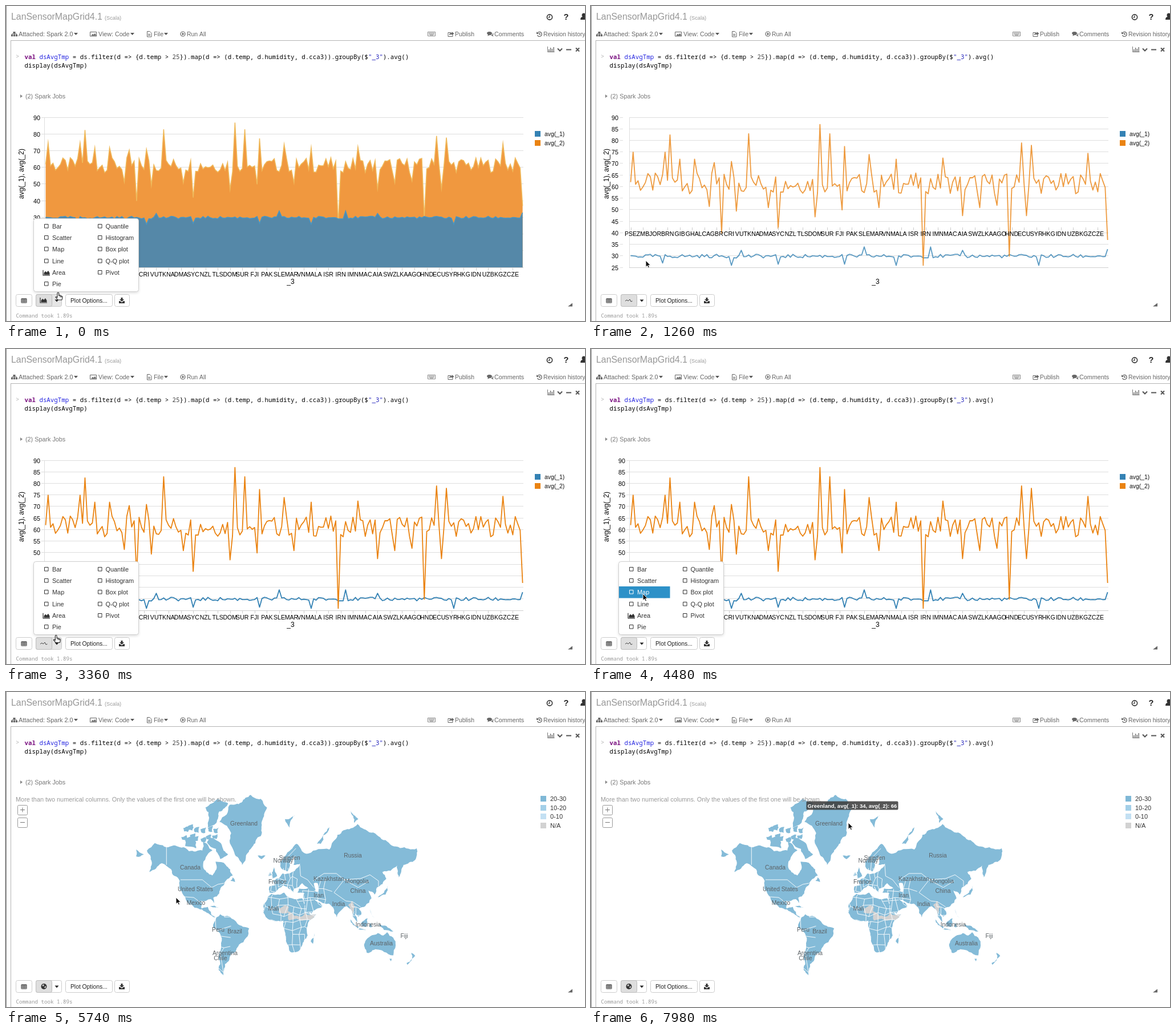
An HTML page with a canvas that plays this animation: 1015x552 px, repeating every 8000 ms.

```html
<!DOCTYPE html>
<html lang="en">
<head>
<meta charset="utf-8">
<title>Notebook plots</title>
<style>
html, body { margin: 0; width: 100%; height: 100%; overflow: hidden; background: #fff; }
canvas { display: block; }
</style>
</head>
<body>
<canvas id="stage" width="1015" height="552"></canvas>
<script>
const ctx = document.getElementById('stage').getContext('2d');
const LOOP = 8000, STEP = 140;
const SANS = '"Liberation Sans", Arial, sans-serif';
const MONO = '"Noto Sans Mono", "DejaVu Sans Mono", monospace';
const BLUE = '#3482b4', ORANGE = '#ea8311', LAND = '#84bbd8', NA = '#d2d2d2';

// ---------- helpers ----------
function text(str, x, y, size = 11, color = '#666', align = 'left', weight = '', family = SANS) {
  ctx.font = `${weight} ${size}px ${family}`;
  ctx.fillStyle = color;
  ctx.textAlign = align;
  ctx.fillText(str, x, y);
  return ctx.measureText(str).width;
}
function rect(x, y, w, h, color) {
  ctx.fillStyle = color;
  ctx.fillRect(x, y, w, h);
}
function box(x, y, w, h, r, fill, stroke) {
  ctx.beginPath();
  ctx.roundRect(x + .5, y + .5, w, h, r);
  if (fill) { ctx.fillStyle = fill; ctx.fill(); }
  if (stroke) { ctx.strokeStyle = stroke; ctx.lineWidth = 1; ctx.stroke(); }
}
function path(d, fill, stroke, width = 1, x = 0, y = 0) {
  const p = new Path2D(d);
  ctx.save();
  ctx.translate(x, y);
  if (fill) { ctx.fillStyle = fill; ctx.fill(p); }
  if (stroke) { ctx.strokeStyle = stroke; ctx.lineWidth = width; ctx.stroke(p); }
  ctx.restore();
}
function circle(x, y, r, fill, stroke, width) {
  ctx.beginPath();
  ctx.arc(x, y, r, 0, 7);
  if (fill) { ctx.fillStyle = fill; ctx.fill(); }
  if (stroke) { ctx.strokeStyle = stroke; ctx.lineWidth = width; ctx.stroke(); }
}
const caret = (x, y, color = '#555') => path('M0 0h7l-3.5 4z', color, null, 1, x, y);
const hash = n => { const s = Math.sin(n * 12.9898) * 43758.5453; return s - Math.floor(s); };

// ---------- chart: seeded noise with a few named extremes ----------
const COUNT = 195, X0 = 69.5, DX = 4.31;
const CODES = ('PSE ZMB JOR BRN GIB GHA LCA GBR CRI VUT KNA DMA SYC NZL TLS DOM SUR FJI PAK SLE ' +
  'MAR VNM ALA ISR IRN IMN MAC AIA SWZ LKA AGO HND ECU SYR HKG IDN UZB KGZ CZE').split(' ');
const humidPeaks = {
  1: 75, 14: 75, 16: 82.5, 20: 72, 26: 72, 32: 51.5, 34: 70.5, 37: 40, 41: 71, 43: 49.5, 48: 83, 56: 51,
  60: 42, 75: 47, 77: 87, 81: 83, 86: 50, 87: 77.5, 97: 74, 101: 51, 108: 72, 119: 26, 127: 72.5,
  135: 47.5, 142: 51, 149: 52, 154: 30, 159: 79, 161: 47.5, 163: 78, 186: 74.5, 194: 37
};
const tempPeaks = { 13: 27, 41: 26, 45: 32.5, 60: 26.5, 87: 26.5, 95: 34, 108: 26, 122: 34, 135: 32.5, 166: 26, 194: 33 };
const series = (peaks, mid, spread, seed) =>
  Array.from({ length: COUNT }, (_, i) => peaks[i] ?? mid + (hash(i + seed) - .5) * spread);
const humid = series(humidPeaks, 61.5, 9, 3);
const temp = series(tempPeaks, 30, 1.6, 500);

function trace(values, yOf) {
  ctx.beginPath();
  values.forEach((v, i) => ctx.lineTo(X0 + i * DX, yOf(v)));
}

function axes(min, step, shifted) {
  const yOf = v => 195.5 + (90 - v) * 263 / (90 - min);
  for (let v = min; v <= 90; v += step) {
    const y = Math.round(yOf(v)) - 1;
    rect(67, y, 840, 1, v === min ? '#cfcfcf' : '#dedede');
    rect(shifted ? 51 : 62, y, 5, 1, '#dedede');
    text(v, shifted ? 48 : 60, y + 4.5, 10.8, '#000', 'right');
  }
  rect(67, 195, 1, 263, '#dedede');
  return yOf;
}

function chartLabels(y) {
  CODES.forEach((code, i) => {
    const x = X0 + i * 5 * DX;
    rect(Math.round(x), y - 15, 1, 5, '#ccc');
    text(code, x, y, 10.6, '#000', 'center');
  });
  text('_3', 499, 487, 12, '#000', 'center');
  ctx.save();
  ctx.translate(31, 294);
  ctx.rotate(-Math.PI / 2);
  text('avg(_1), avg(_2)', 0, 0, 12, '#000', 'center');
  ctx.restore();
  [BLUE, ORANGE].forEach((color, i) => {
    rect(927, 219 + i * 16, 10, 10, color);
    text(`avg(_${i + 1})`, 944, 228 + i * 15.7, 10.4, '#111');
  });
}

function areaChart() {
  const yOf = axes(0, 10);
  const layers = [[humid, '#f0983f', '#efba5c'], [temp, '#5588a8', '#4796c4']];
  layers.forEach(([values, fill, edge]) => {
    trace(values, yOf);
    ctx.lineTo(X0 + (COUNT - 1) * DX, 458);
    ctx.lineTo(X0, 458);
    ctx.fillStyle = fill;
    ctx.fill();
    trace(values, yOf);
    ctx.strokeStyle = edge;
    ctx.lineWidth = 1.5;
    ctx.stroke();
  });
  chartLabels(473.5);
}

function lineChart(settling) {
  const yOf = axes(25, 5, settling);
  ctx.globalAlpha = settling ? .8 : 1;
  ctx.lineWidth = 1.8;
  ctx.lineJoin = 'round';
  [[temp, BLUE], [humid, ORANGE]].forEach(([values, color]) => {
    trace(values, yOf);
    ctx.strokeStyle = color;
    ctx.stroke();
  });
  ctx.globalAlpha = 1;
  chartLabels(settling ? 403 : 473.5);
}

// ---------- world map: a few lon,lat corners, Mercator view, fractal coasts ----------
const project = (lon, lat) =>
  [474 + lon * 1.3667, 406 - 78.3 * Math.log(Math.tan(Math.PI / 4 + lat * Math.PI / 360))];
const points = str => str.split(' ').map(p => project(...p.split(',').map(Number)));

function roughen(a, b, out) {
  const dx = b[0] - a[0], dy = b[1] - a[1];
  if (Math.hypot(dx, dy) < 5) return out.push(b);
  const k = (hash(a[0] + b[1]) - .5) * .3;
  const mid = [(a[0] + b[0]) / 2 - dy * k, (a[1] + b[1]) / 2 + dx * k];
  roughen(a, mid, out);
  roughen(mid, b, out);
}
const toPath = pts => 'M' + pts.map(p => p.map(n => n.toFixed(1))).join('L');
function coast(str) {
  const pts = points(str), out = [];
  pts.forEach((p, i) => roughen(p, pts[(i + 1) % pts.length], out));
  return new Path2D(toPath(out) + 'Z');
}

const americas = [
  '-166,68 -156,71.3 -128,70 -95,68 -94,72 -82,68 -94,59 -82,52.5 -77,57 -78,62 -65,60 -56,52.5 -65,48 -70,43 -81,31.5 -80,25.5 -84,30 -97,28 -96,19 -88,21 -84,15 -83,11 -78,8 -87,13 -105,20 -113,30 -110,23 -117,32.5 -124,40 -124,48 -135,57 -147,61 -163,55 -160,60',
  '-73,78.3 -60,82 -33,83.6 -12,81.5 -20,74 -39,65.5 -44,60 -54,67 -58,75',
  '-62,66 -72,63.5 -89,71.5 -86,73.5 -70,70.5', '-62,82.3 -75,83 -91,81.5 -88,76.5 -77,78',
  '-117,73 -105,73.5 -103,69 -117,70', '-59,48 -56,51 -53,47', '-85,22 -74,20 -78,20.5',
  '-77,8 -72,12 -60,9 -50,0 -35,-6 -39,-18 -48,-26 -58,-36 -66,-46 -68,-55 -74,-51 -71,-30 -70,-18 -81,-5'
];
const africa = [
  '-6,35.8 10,37 20,31 33,31 43,11.5 51,12 40,-3 40,-15 33,-27 26,-34 18,-34 12,-17 9,4 -8,4.5 -17,14.5 -13,27.5',
  '49,-12 47,-25 44,-22'
];
const eurasia = [
  '28,70 41,66.5 68,68.5 73,72 104,77.7 140,72.5 180,69 178,63 163,60 157,51 155,59.5 136,55 141,50 129,42 126,35 118,39 122,31 114,22 106,19 109,12 105,9 100,13 104,2 98,9 97,16 90,22 80,14 77.5,8 73,20 67,25 57,27 48,30 56,26 59,22 45,13 35,28 36,36.5 27,37 29,41 41,41.5 33,46 23,41 22,37 12,45 18,40 9,44 -2,37 -9,37 -9,43 -2,44 -4,48 8,54 20,55 30,60',
  '5,59 5,62 14,67 26,71 31,69 31,61 22,60 25,65.5 17,61 14,55.5',
  '-5,50 1,52 -3,58.5', '-10,52 -6,53 -8,55', '-24,65.5 -14,65.5 -19,63.4', '11,79 25,80.2 17,76.7',
  '52,71 68,76.8 57,71', '95,81 105,79 100,78', '130,32 138,37 143,44 140,35', '-180,68.5 -170,66 -180,65'
];
const oceania = [
  '95,5.5 106,-4 104,-6', '105,-6.5 114,-7.5 114,-8.6', '109,1.5 117,7 116,-4 110,-3', '119,-4 121,1 122,-5',
  '131,-1 141,-3 150,-10 138,-8', '120,18.5 126,7 122,12',
  '114,-22 130,-12 137,-15 142,-11 153,-27 150,-37.5 138,-34 131,-31.5 116,-35',
  '145,-41 148,-41 147,-43.5', '173,-35 178,-38 174,-41', '174,-41 168,-46.5 167,-45'
];
// Loose islands of the Canadian north
const isles = Array.from({ length: 12 }, (_, i) => {
  const lon = -122 + (i % 6) * 7.5 + hash(i) * 4, lat = (i < 6 ? 72.5 : 76) + hash(i + 40) * 2;
  return `${lon},${lat} ${lon + 7},${lat + .6} ${lon + 6},${lat - 1.2} ${lon + 1},${lat - 1}`;
});
const land = new Path2D();
[...americas, ...isles, ...africa, ...eurasia, ...oceania].forEach(s => land.addPath(coast(s)));
const caspian = coast('48,46 53,46 53,37.5 50,38');
const noData = [
  '3,14 4,19 12,23 16,21 14,13', '14,16 19,14 23,10 34,10 36,14 43,11 51,12 46,3 36,4.5 16,4',
  '92,23 97,28 101,21 98,12 95,16'
].map(coast);

const borders = new Path2D([
  '-141,60 -141,70', '-123,49 -95,49 -83,42 -75,45 -67,46', '-117,32.5 -106,31.8 -97,26',
  '30,60 31,52 40,49 48,42', '47,48 61,54 77,54 87,49 108,50 120,53 131,48 131,43',
  '87,49 105,42 119,48', '87,49 74,37 89,28 98,27 108,21', '12,56 13,64 25,69'
].map(s => toPath(points(s))).join(''));

// Small countries: a jittered mesh with some edges left out
function mesh(west, south, east, north, cell) {
  const node = (i, j) => project(
    west + (i + (hash(i * 7 + j * 31 + cell) - .5) * .7) * cell,
    south + (j + (hash(i * 13 + j * 17 + cell) - .5) * .7) * cell);
  for (let i = 0; i * cell < east - west; i++) {
    for (let j = 0; j * cell < north - south; j++) {
      [[i + 1, j], [i, j + 1]].forEach(([u, v], side) => {
        if (hash(i * 5 + j * 11 + side * 3) < .8) borders.addPath(new Path2D(toPath([node(i, j), node(u, v)])));
      });
    }
  }
}
mesh(-15, -33, 45, 32, 9);
mesh(-8, 38, 30, 55, 6);
mesh(-80, -50, -60, 10, 11);
mesh(36, 14, 72, 46, 9);
mesh(98, 10, 108, 22, 5);

const places = [
  ['Greenland', 417, 234], ['Canada', 323, 310.5], ['United States', 332, 348.5], ['Mexico', 333, 373], ['Peru', 372, 419.5],
  ['Brazil', 401, 422.5], ['Argentina', 384, 461], ['Chile', 376, 470], ['Sweden', 497, 294], ['Norway', 486, 298.5],
  ['France', 476, 335.5], ['Mali', 469, 383], ['Russia', 608, 290], ['Kazakhstan', 566, 331], ['Mongolia', 615, 334.5],
  ['China', 617, 351.5], ['Iran', 548, 359.5], ['India', 583, 374.5], ['Indonesia', 635, 410.5], ['Fiji', 698, 431], ['Australia', 658, 444]
];
const bands = [['20-30', '#7fb8d6'], ['10-20', '#a3cfe8'], ['0-10', '#c3e0f3'], ['N/A', NA]];

function worldMap() {
  ctx.save();
  ctx.fillStyle = LAND;
  ctx.fill(land);
  ctx.clip(land);
  ctx.fillStyle = NA;
  noData.forEach(p => ctx.fill(p));
  ctx.strokeStyle = '#fff';
  ctx.lineWidth = .9;
  ctx.stroke(borders);
  ctx.fillStyle = '#fff';
  ctx.fill(caspian);
  ctx.restore();
  places.forEach(([name, x, y]) => text(name, x, y, 10.3, '#5c6266', 'center'));
  text('More than two numerical columns. Only the values of the first one will be shown.', 17, 191.5, 10.9, '#999');
  [198, 220].forEach((y, i) => {
    box(20, y, 17, 17, 2, '#fff', '#999');
    rect(25, y + 8, 8, 1, '#777');
    if (!i) rect(28.5, y + 4.5, 1, 8, '#777');
  });
  bands.forEach(([label, color], i) => {
    rect(937, 182 + Math.round(i * 15.7), 10, 10, color);
    text(label, 954, 191 + i * 15.7, 11, '#333');
  });
}

function tooltip(str, x, y, w) {
  box(x, y, w, 15, 2, 'rgba(62,62,62,.88)');
  text(str, x + w / 2 + .5, y + 11.5, 9.5, '#fff', 'center', 'bold');
}

// ---------- notebook frame ----------
function header() {
  const g = '#666';
  rect(0, 0, 1, 552, '#8a8a8a');
  text('LanSensorMapGrid4.1', 9, 24, 15.9, '#979797');
  text('(Scala)', 173, 24, 9.2, '#999');
  circle(953, 19.5, 4.6, null, '#333', 1.6);
  path('M953 16.5v3.3h-2.5', null, '#333', 1.2);
  text('?', 982, 24, 14.5, '#222', 'center', 'bold');
  path('M1007 24q0-5 4-5h5v5z', '#333');
  circle(1013, 16, 3.5, '#333');

  path('M12.5 45h4v3h-4zM9 50h3.2v3.2H9zM13 50h3.2v3.2H13zM17 50h3.2v3.2H17z', g);
  path('M10.5 50v-1.2h8V50M14.5 48v2', null, g);
  text('Attached: Spark 2.0', 22, 52.5, 10.9);
  path('M147.5 45.5h11v7.5h-11z', null, g);
  path('M149 52l3-3 2 1.5 2-3 2 4.5z', g);
  text('View: Code', 162, 52.5, 10.7);
  path('M247.5 44.5h4.5l3 3v6.5h-7.5zM249 49.5h4M249 51.5h4', null, g);
  text('File', 259, 52.5, 10.6);
  [119, 218, 277].forEach(x => caret(x, 47));
  circle(310, 49, 4, null, g, 1.2);
  path('M308.7 46.5l4 2.5-4 2.5z', g);
  text('Run All', 317, 52.5, 10.4);

  path('M739.5 45.5h13v7h-13zM741 47.5h10M741 49.5h10M743 51h6', null, '#888');
  path('M780 46.5h-5v7h8v-3', null, g);
  path('M777 51q0-4 4.5-4v-2l4 3.2-4 3.2v-2q-3 0-4.5 1.6z', g);
  text('Publish', 787, 53, 10.4);
  path('M843 48a4.5 3 0 1 1 5 3l-4 1.5 1-2zM850 51q4 0 3.5-4 2 2 0 4l1 2.5-3-1.5z', g);
  text('Comments', 856, 53, 10.8);
  path('M932 47a4 4 0 1 1-.5 4M935 47v2.5h2', null, g, 1.3);
  path('M930 45v4h4z', g);
  text('Revision history', 942, 53, 10.4);

  rect(8, 60, 1007, 1, '#b4b4b4');
  rect(8, 60, 1, 492, '#b4b4b4');
  path('M949.5 71v9.5h12', null, '#777');
  [4, 7, 5, 8].forEach((h, i) => rect(951 + i * 2.8, 80 - h, 1.5, h, '#777'));
  path('M967 74.5l4 4 4-4M999 73.5l6 6M1005 73.5l-6 6M982 76.5h9', null, '#555', 2);
}

const code = [['val', '#7a1080', 'bold'], [' '], ['dsAvgTmp', '#2424e0'],
  [' = ds.filter(d => {d.temp > '], ['25', '#444'], ['}).map(d => (d.temp, d.humidity, d.cca3)).groupBy($'],
  ['"_3"', '#2222bb'], [').avg()']];

function cell() {
  text('>', 17, 92, 10.8, '#b5b5b5', 'left', '', MONO);
  let x = 32.5;
  code.forEach(([str, color = '#000', weight]) => x += text(str, x, 92.5, 10.8, color, 'left', weight, MONO));
  text('display(dsAvgTmp)', 32.5, 107.5, 10.8, '#000', 'left', '', MONO);
  path('M25 155l4 3-4 3z', '#888');
  text('(2) Spark Jobs', 34, 162, 10.8, '#777');
  text('Command took 1.89s', 17.5, 546, 9.17, '#999', 'left', '', MONO);
  path('M985 526.5l8-6v6z', '#666');
}

function areaIcon(x, y) {
  path('M0 0v9h12', null, '#333', 1.2, x, y);
  path('M1.5 8v-3l2.5-3 2.5 2 2.5-3 2.5 4v3z', '#333', null, 1, x, y);
}

function toolbar(view, overCaret) {
  box(17, 505, 28, 21, 3, '#fff', '#ccc');
  box(52, 505, 45, 21, 3, overCaret ? '#e6e6e6' : '#fff', '#ccc');
  box(52, 505, 28, 21, 3, '#dedede', '#bbb');
  box(104, 505, 82, 21, 3, '#fff', '#ccc');
  box(190, 505, 26, 21, 3, '#fff', '#ccc');
  box(26, 512, 10, 8, 1, '#333');
  for (let i = 0; i < 9; i++) rect(27.5 + i % 3 * 3, 514 + Math.floor(i / 3) * 2.2, 2, 1.3, '#fff');
  if (view === 'area') areaIcon(60, 511);
  else if (view === 'line') path('M60 517l3-2 2 2 3-3 2 4 2.5-1', null, '#444');
  else {
    circle(66.5, 516, 5, '#333');
    path('M63 514l3-2 1 2-2 2zM67 517l3-2 0 3-2 1z', '#ccc');
  }
  caret(85.5, 514.5, '#222');
  text('Plot Options...', 113, 519.8, 10.3, '#222');
  path('M201.5 511h3v3h2.5l-4 4-4-4h2.5zM198 517h2l3 2.5 3-2.5h2v4h-10z', '#333');
}

const menuItems = [['Bar', 'Scatter', 'Map', 'Line', 'Area', 'Pie'], ['Quantile', 'Histogram', 'Box plot', 'Q-Q plot', 'Pivot']];

function menu(pos) {
  ctx.save();
  ctx.shadowColor = 'rgba(0,0,0,.15)';
  ctx.shadowBlur = 5;
  ctx.shadowOffsetY = 2;
  box(48, 372, 184, 128, 4, '#fff');
  ctx.restore();
  box(48, 372, 184, 128, 4, null, '#d0d0d0');
  const hover = pos.y < 498 ? Math.floor((pos.y - 376.5) / 20.2) : -1;
  if (hover >= 0) rect(49, Math.round(376 + hover * 20.2), 89.5, 20.5, '#2d91c8');
  menuItems.forEach((column, c) => column.forEach((name, r) => {
    const y = 390 + r * 20.2;
    const color = !c && r === hover ? '#fff' : '#333';
    if (name === 'Area') areaIcon(65, y - 8);
    else box(67 + c * 94, Math.round(y) - 8, 6.5, 6.5, 0, null, color);
    text(name, 81 + c * 93.5, y, 10.9, color);
  }));
}

// ---------- pointer ----------
const route = [
  [0, 92, 502], [420, 92, 494], [980, 96, 446], [1400, 96, 446], [2240, 88, 512], [3080, 88, 512],
  [4340, 91, 429], [4760, 91, 429], [5740, 298, 360], [6300, 303, 348], [6720, 309, 284],
  [7000, 312, 282], [7700, 451, 229], [LOOP, 451, 229]
];
function pointerAt(t) {
  const n = route.findIndex(k => k[0] > t);
  const [t0, x0, y0] = route[n - 1], [t1, x1, y1] = route[n];
  let k = (t - t0) / (t1 - t0);
  k = k * k * (3 - 2 * k);
  return { x: x0 + (x1 - x0) * k, y: y0 + (y1 - y0) * k };
}
function pointer({ x, y }, hand) {
  ctx.lineJoin = 'round';
  if (hand) path('M-2 7V1.5Q-2 0-.7 0T.7 1.5V5.5Q2 4.5 3 6 4.3 5.2 5.2 6.7 7 6 7 8.5L6 13H-1L-5 8.5Q-5 6.5-2 9zM3 6v2.5M5.2 6.7v2', '#fff', '#222', 1.1, x, y);
  else path('M0 0V11.5L2.7 9 4.5 13 6.5 12.1 4.7 8.3H8.3Z', '#111', '#fff', .9, x, y);
  ctx.lineJoin = 'miter';
}

// ---------- timeline ----------
function frame(now) {
  const t = Math.floor(now % LOOP / STEP) * STEP;
  const pos = pointerAt(t);
  const view = t < 1260 ? 'area' : t < 4620 ? 'line' : 'map';
  const open = t < 1120 || (t >= 2800 && t < 4620);
  const overCaret = pos.y > 500 && pos.x < 98;

  rect(0, 0, 1015, 552, '#fff');
  header();
  cell();
  if (view === 'area') areaChart();
  else if (view === 'line') lineChart(t < 1400);
  else worldMap();
  toolbar(view, overCaret);
  if (open) menu(pos);
  if (t >= 7560) tooltip('Greenland, avg(_1): 34, avg(_2): 66', 377, 191, 161);
  else if (t >= 6580 && t < 7140) tooltip('Canada, avg(_1): 30.0, avg(_2): 61.3', pos.x - 50, pos.y - 20, 166);
  pointer(pos, overCaret);
  requestAnimationFrame(frame);
}
requestAnimationFrame(frame);
</script>
</body>
</html>
```
